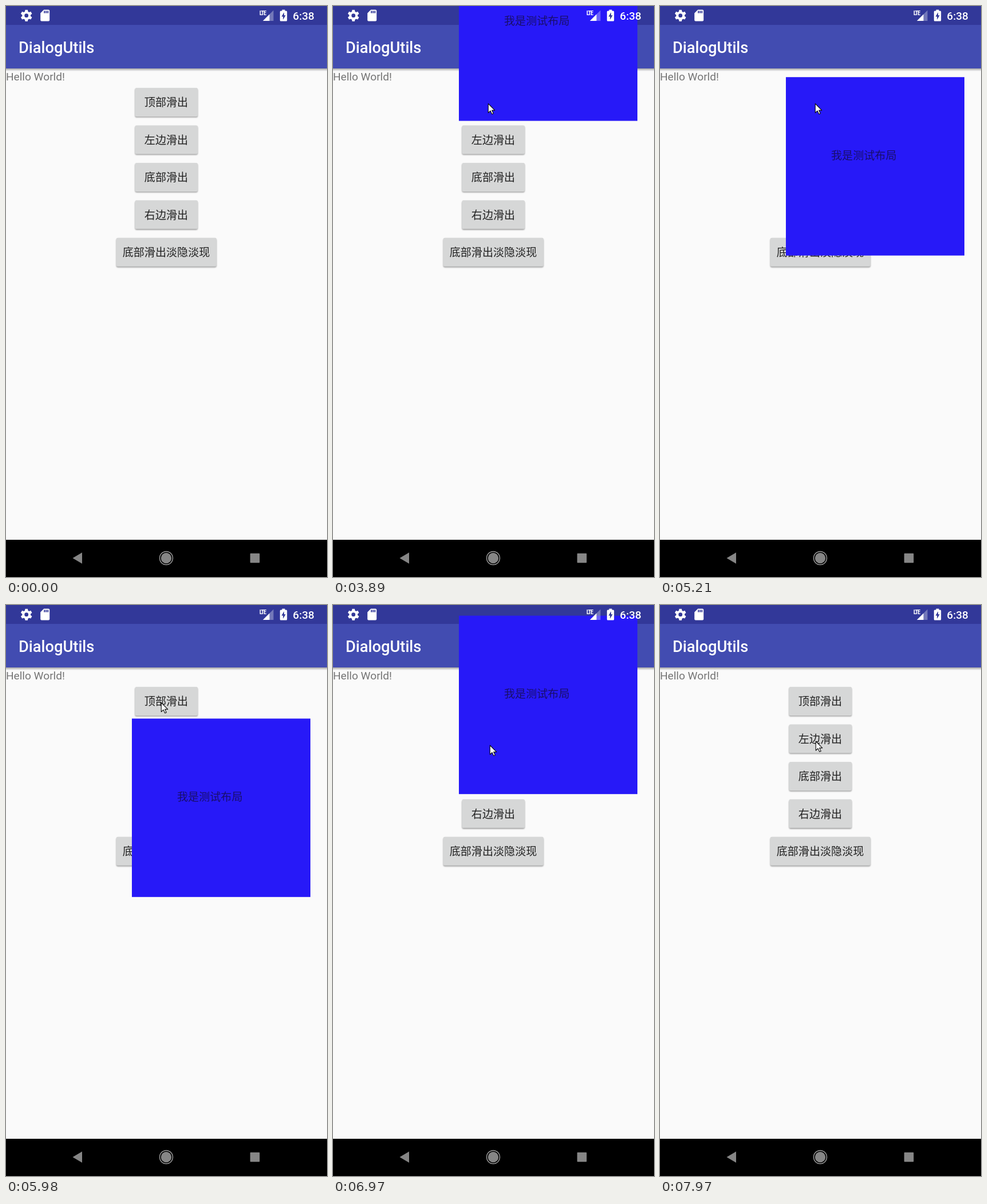
An HTML page that plays this animation: 561x997 px, repeating every 8 s.

```html
<!DOCTYPE html>
<html lang="zh-CN">
<head>
<meta charset="utf-8">
<title>DialogUtils</title>
<style>
  html, body { margin: 0; width: 100%; height: 100%; overflow: hidden; background: #fafafa; }
  svg { display: block; width: 100vw; height: 100vh; }
  text { font-family: Roboto, "Noto Sans CJK SC", "Noto Sans CJK", sans-serif; font-size: 19.09px; }
  .medium { font-weight: 500; fill: #fff; }
</style>
</head>
<body>
<svg viewBox="0 0 561 997">
  <defs>
    <filter id="blur" x="-20%" y="-40%" width="140%" height="180%"><feGaussianBlur stdDeviation="1.3"/></filter>
    <linearGradient id="fade" x2="0" y2="1">
      <stop offset="0" stop-opacity=".34"/>
      <stop offset="1" stop-opacity="0"/>
    </linearGradient>
    <clipPath id="press"><rect x="225.5" y="143" width="109.5" height="50" rx="2.7"/></clipPath>
  </defs>

  <rect width="561" height="997" fill="#fafafa"/>
  <text x="0" y="130" fill="#757575">Hello World!</text>
  <g id="buttons"></g>
  <circle id="ripple" cx="271" cy="170" clip-path="url(#press)"/>

  <rect y="109" width="561" height="5" fill="url(#fade)"/>
  <rect width="561" height="109" fill="#424cb1"/>
  <rect width="561" height="33" fill="#323899"/>
  <text class="medium" x="22" y="81.5" style="font-size:27.27px">DialogUtils</text>

  <g id="panel">
    <rect width="312" height="311.5" fill="#2719f8"/>
    <text x="79" y="143.5" fill="#190f6b">我是测试布局</text>
  </g>

  <g fill="#fff">
    <g id="gear" transform="translate(35.7 16.7)">
      <circle r="5.4" fill="none" stroke="#fff" stroke-width="4"/>
    </g>
    <path transform="translate(56.2 4.4)" fill-rule="evenodd"
      d="M18 2H10L4 8V20a2 2 0 0 0 2 2H18a2 2 0 0 0 2-2V4a2 2 0 0 0-2-2ZM10 4h2v4h-2ZM13 4h2v4h-2ZM16 4h2v4h-2Z"/>
    <path d="M467.5 7.5V26H449Z" opacity=".32"/>
    <path d="M460.5 14.5V26H449Z"/>
    <text x="443" y="15.5" style="font-family:'Roboto Condensed',Roboto,sans-serif;font-size:10.5px;font-weight:700;letter-spacing:-1.4px">LTE</text>
    <path d="M482.5 6.5h5v2h2.2a1.5 1.5 0 0 1 1.5 1.5V25a1.5 1.5 0 0 1-1.5 1.5h-9.400a1.500 1.500 0 0 1-1.500-1.500V10a1.500 1.500 0 0 1 1.500-1.500h2.200Z"/>
    <path d="M486 11L481.500 18.500H484.200V24L488.700 16.200H486Z" fill="#323899"/>
    <text class="medium" x="501.300" y="23.500">6:38</text>
  </g>

  <rect y="932" width="561" height="65" fill="#000"/>
  <g fill="#868686">
    <path d="M116.500 964L133 954.300V973.700Z"/>
    <circle cx="280" cy="964" r="9.200"/>
    <circle cx="280" cy="964" r="11.500" fill="none" stroke="#a0a0a0" stroke-width="1.400"/>
    <rect x="426.700" y="955.700" width="16.600" height="16.600" rx="1"/>
  </g>

  <path id="cursor" d="M0 0V16L3.800 12.500L6.500 18.300L9 17.200L6.400 11.600H11.500Z"
    fill="#fff" stroke="#111" stroke-width="1.100" stroke-linejoin="round"/>
</svg>
<script>
  const LOOP = 8000;
  const SLIDE = 2000;
  const PRESS = 3720, ENTER = 3872, EXIT = 5863;
  const HIDDEN_Y = -111, TRAVEL = 312;
  const $ = id => document.getElementById(id);

  function add(parent, tag, attrs, label = '') {
    const node = document.createElementNS('http://www.w3.org/2000/svg', tag);
    for (const key in attrs) node.setAttribute(key, attrs[key]);
    node.textContent = label;
    parent.append(node);
  }

  ['顶部滑出', '左边滑出', '底部滑出', '右边滑出', '底部滑出淡隐淡现'].forEach((label, i) => {
    const width = i < 4 ? 109.5 : 175;
    const box = { x: 280.3 - width / 2, y: 143 + 65.45 * i, width, height: 50, rx: 2.7 };
    add($('buttons'), 'rect', { ...box, y: box.y + 1.6, opacity: .36, filter: 'url(#blur)' });
    add($('buttons'), 'rect', { ...box, fill: '#d6d7d7' });
    add($('buttons'), 'text', { x: 280, y: box.y + 32.3, 'text-anchor': 'middle', fill: '#212121' }, label);
  });

  for (let a = 0; a < 360; a += 60) {
    add($('gear'), 'path', { d: 'M-2.9-6L-2.2-10H2.2L2.9-6Z', transform: `rotate(${a})` });
  }

  const clamp = v => Math.min(1, Math.max(0, v));
  const ease = v => (1 - Math.cos(Math.PI * clamp(v))) / 2;
  const show = (node, on) => node.setAttribute('visibility', on ? 'visible' : 'hidden');
  const move = (node, x, y) => node.setAttribute('transform', `translate(${x} ${y})`);

  function draw(t) {
    const slide = ease((t - ENTER) / SLIDE) - ease((t - EXIT) / SLIDE);
    show($('panel'), t >= ENTER - 12 && t < EXIT + SLIDE);
    move($('panel'), 220, HIDDEN_Y + TRAVEL * slide);

    const spread = clamp((t - PRESS) / 220);
    show($('ripple'), t >= PRESS && t < ENTER + 400);
    $('ripple').setAttribute('r', 10 + 75 * spread);
    $('ripple').setAttribute('opacity', .1 * (1 - clamp((t - ENTER) / 300)));

    const down = ease((t - 6350) / 450);
    const back = ease((t - 7250) / 300);
    show($('cursor'), t >= 3020);
    move($('cursor'), 271.3 + 3 * down - 2 * back, 170.500 + 74.500 * down - 7 * back);
  }

  const start = performance.now();
  function tick() {
    draw((performance.now() - start) % LOOP);
    requestAnimationFrame(tick);
  }
  tick();
</script>
</body>
</html>
```
